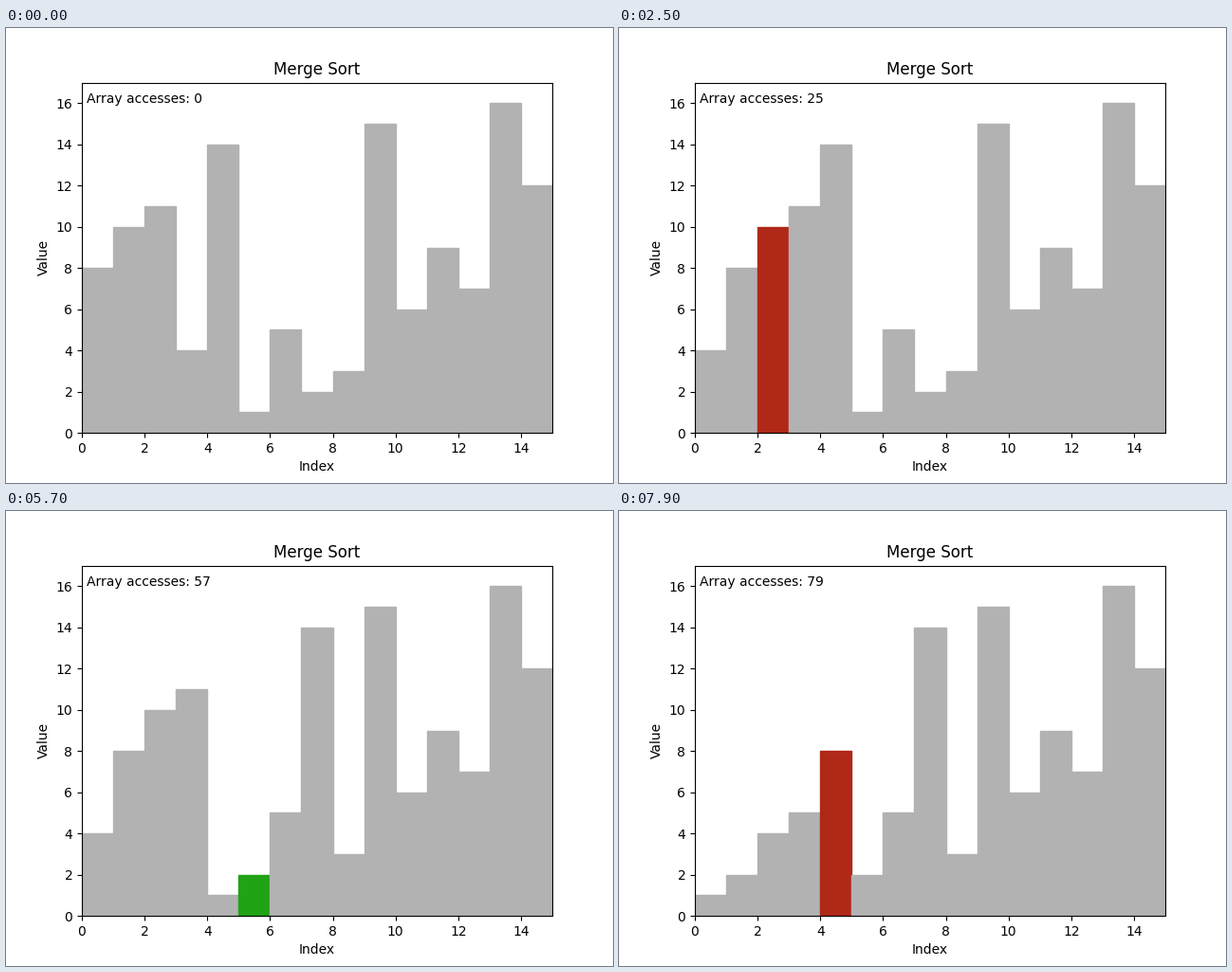
These frames come from a looping animation (640 by 480 pixels, 8 s). A matplotlib script:

```python
import matplotlib.pyplot as plt
from matplotlib.animation import FuncAnimation

FRAMES = 80
IDLE, READ, WRITE = "#b2b2b2", "#20a315", "#b02818"
START = [8, 10, 11, 4, 14, 1, 5, 2, 3, 15, 6, 9, 7, 16, 12, 13]


class TrackedList:
    """A list that logs every read and write with a copy of its state."""

    def __init__(self, values):
        self.values = list(values)
        self.log = [(None, IDLE, list(values))]

    def __getitem__(self, i):
        self.log.append((i, READ, list(self.values)))
        return self.values[i]

    def __setitem__(self, i, value):
        self.values[i] = value
        self.log.append((i, WRITE, list(self.values)))


def merge(a, lo, mid, hi):
    merged = []
    i, j = lo, mid
    while i < mid and j < hi:
        if a[i] <= a[j]:
            merged.append(a[i])
            i += 1
        else:
            merged.append(a[j])
            j += 1
    for k in (*range(i, mid), *range(j, hi)):
        merged.append(a[k])
    for k, value in enumerate(merged, lo):
        a[k] = value


def merge_sort(a, lo, hi):
    if hi - lo > 1:
        mid = (lo + hi) // 2
        merge_sort(a, lo, mid)
        merge_sort(a, mid, hi)
        merge(a, lo, mid, hi)


data = TrackedList(START)
merge_sort(data, 0, len(START))

plt.rcParams["font.family"] = "DejaVu Sans"
fig, ax = plt.subplots(figsize=(6.4, 4.8), dpi=100)
bars = ax.bar(range(len(START)), START, width=1, align="edge", color=IDLE)
ax.set(xlim=(0, len(START) - 1), ylim=(0, max(START) + 1),
       xlabel="Index", ylabel="Value", title="Merge Sort")
counter = ax.text(0.15, 16, "")


def update(frame):
    index, color, values = data.log[frame]
    for i, (bar, value) in enumerate(zip(bars, values)):
        bar.set_height(value)
        bar.set_color(color if i == index else IDLE)
    counter.set_text(f"Array accesses: {frame}")
    return [*bars, counter]


anim = FuncAnimation(fig, update, frames=FRAMES, interval=100,
                     repeat=True, repeat_delay=0, blit=False)
plt.show()
```
